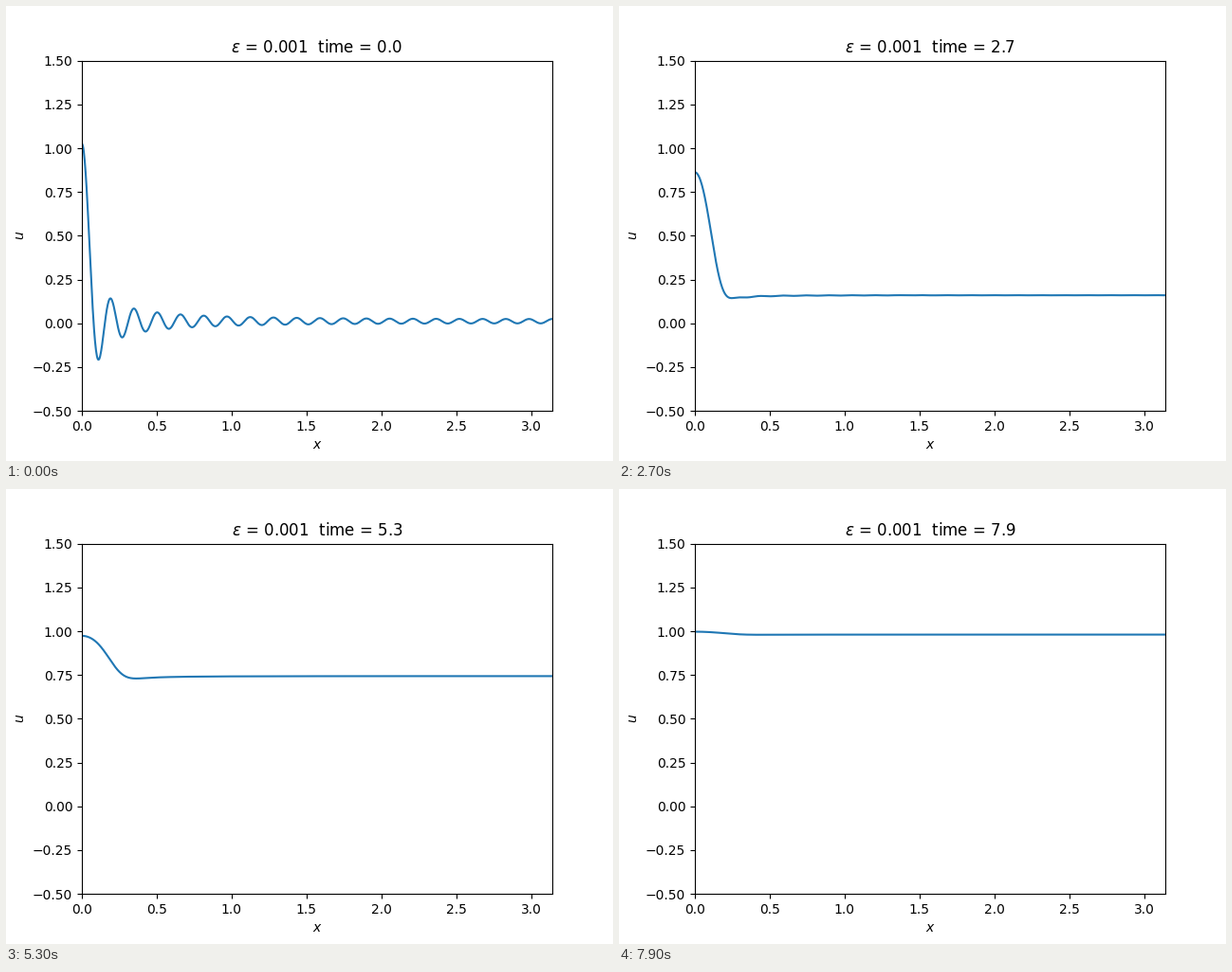
Animation, 640 px wide and 480 px high, one loop 8 s. Source, as a matplotlib script:

```python
import numpy as np
import matplotlib.pyplot as plt
from matplotlib.animation import FuncAnimation

# Fisher equation u_t = eps u_xx + u (1 - u), cosine Galerkin method
EPS = 0.001
N = 40        # highest cosine mode
DT = 0.1
FRAMES = 80

k = np.arange(N + 1)
M = 4 * N     # quadrature points, enough to avoid aliasing
nodes = (np.arange(M) + 0.5) * np.pi / M
basis = np.cos(np.outer(k, nodes))
weight = np.where(k == 0, 1.0, 2.0) / M
rate = 1 - EPS * k**2


def step(a):
    """Crank-Nicolson for the linear part, explicit Euler for -u^2."""
    square = weight * (basis @ (a @ basis) ** 2)
    return ((1 + DT / 2 * rate) * a - DT * square) / (1 - DT / 2 * rate)


modes = [np.full(N + 1, 1 / N)]
for _ in range(FRAMES - 1):
    modes.append(step(modes[-1]))

x = np.linspace(0, np.pi, 1001)
curves = np.array(modes) @ np.cos(np.outer(k, x))

fig, ax = plt.subplots(figsize=(6.4, 4.8), dpi=100)
line, = ax.plot(x, curves[0])
ax.set_xlim(0, np.pi)
ax.set_ylim(-0.5, 1.5)
ax.set_xlabel("$x$")
ax.set_ylabel("$u$")
title = ax.set_title("")


def update(i):
    line.set_ydata(curves[i])
    title.set_text(rf"$\varepsilon$ = {EPS}  time = {i * DT:.1f}")
    return line, title


anim = FuncAnimation(fig, update, frames=FRAMES, interval=100,
                     repeat=True, repeat_delay=0, blit=False)
plt.show()
```
